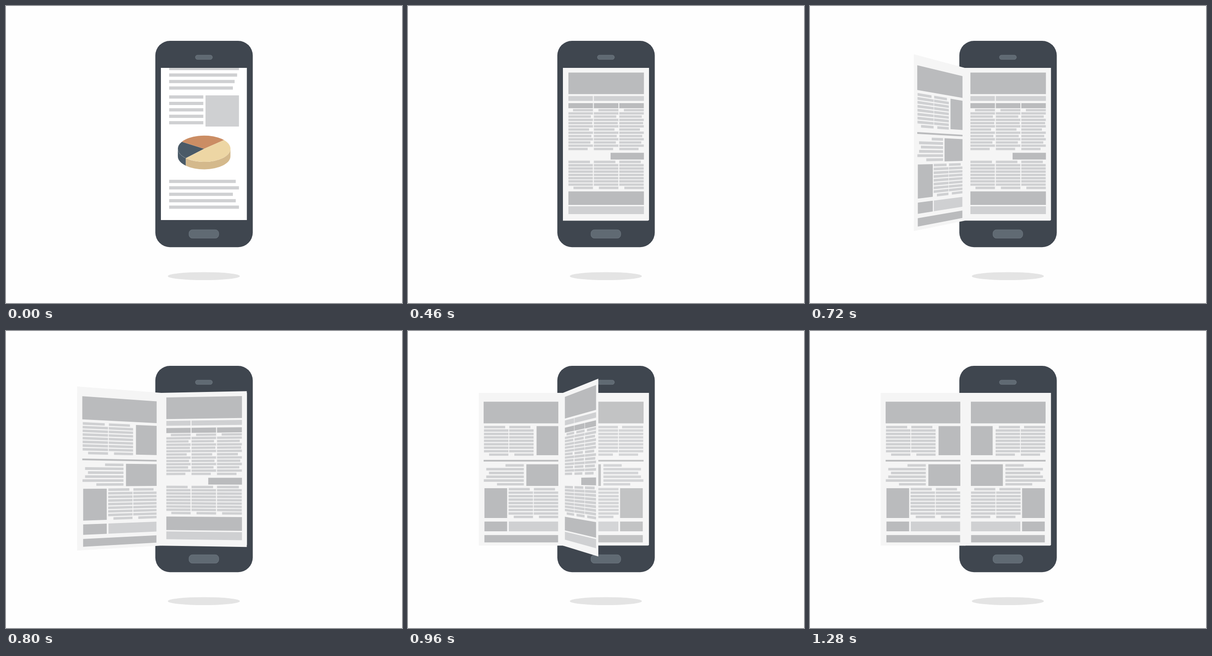
Write an HTML page with a canvas that moves like this. It is 864x648 px and loops after 1.62 s.

```html
<!DOCTYPE html>
<html lang="en">
<head>
<meta charset="utf-8">
<title>Newspaper unfolding from a phone</title>
<style>
  html, body { margin: 0; width: 100%; height: 100%; overflow: hidden; background: #fefefe; }
  canvas { display: block; width: 864px; height: 648px; }
</style>
</head>
<body>
<canvas id="stage" width="864" height="648"></canvas>
<script>
const W = 864, H = 648;
const LOOP = 1620, STEP = 20;
const FADE = 340;
const FLIP_1 = { start: 460, length: 400 };
const FLIP_2 = { start: 780, length: 500 };
const INK = '#babbbd', PALE = '#cfd0d2', PAPER = '#f5f5f5', SLATE = '#3f464f';
const HINGE = 338, CAMERA = 1200, MIRROR = 679;
const TOP = 135, BOTTOM = 468.3;

const ctx = document.getElementById('stage').getContext('2d');
const clamp = v => Math.min(1, Math.max(0, v));
const box = (color, x, y, w, h) => ({ color, x, y, w, h });

// Evenly spaced text lines; each row is [indent, width].
const lines = (x, y, pitch, h, rows) =>
  rows.map(([indent, w], i) => box(PALE, x + indent, y + i * pitch, w, h));

const column = (x, y, pitch, first, last) => {
  const rows = Array.from({ length: 9 }, () => [0, 53.3]);
  rows[0] = first;
  rows[8] = last;
  return lines(x, y, pitch, 5.2, rows);
};

function frontPage() {
  const cols = [350, 405.5, 461];
  const widths = [53.5, 49, 53.5, 52, 53.5, 45, 53.5, 50, 53.5, 48, 53.5, 42];
  const story = [[10, 43.5], ...widths.map(w => [0, w])];
  return [
    box(INK, 350, 145.3, 164.7, 47),
    box(PALE, 350, 196.5, 53.3, 10.5),
    box(PALE, 405.5, 196.5, 109.2, 10.5),
    ...cols.flatMap(x => [
      box(INK, x, 212, 53.5, 11),
      ...lines(x, 224.7, 7.06, 5, story),
      ...column(x, 337.6, 7.08, [0, 47], [11, 42.5])
    ]),
    box(INK, 442, 320.2, 72.7, 14.8),
    box(INK, 350, 404.6, 164.7, 29.4),
    box(PALE, 350, 437, 164.7, 17)
  ];
}

function innerPage() {
  const brief = [40, 82, 76, 82, 87.3, 58.5].map(w => [0, w]);
  return [
    box(INK, 351, 154.2, 163, 47.2),
    box(INK, 351, 207.5, 47.5, 63.5),
    ...[405, 460].flatMap(x => column(x, 207, 7.52, [7, 46], [0, 42])),
    box(INK, 351, 281.3, 163, 3.5),
    box(INK, 351, 290.7, 69.8, 47.3),
    ...lines(426.3, 290.6, 8.22, 5.4, brief),
    ...[351.3, 406.3].flatMap(x => column(x, 342.6, 7.55, [7, 46], [0, 42])),
    box(INK, 462.7, 343, 49.5, 65),
    box(PALE, 351.5, 415.7, 107.5, 21.3),
    box(INK, 462.7, 415.7, 49.5, 21.3),
    box(INK, 351.5, 445.3, 160.8, 16)
  ];
}

const FRONT = frontPage(), INNER = innerPage();

function pill(c, x, y, w, h, r, fill, stroke) {
  c.beginPath();
  c.roundRect(x, y, w, h, r);
  c.fillStyle = fill;
  c.fill();
  if (stroke) {
    c.strokeStyle = stroke;
    c.lineWidth = 0.7;
    c.stroke();
  }
}

function drawPie(c) {
  const cx = 432.3, cy = 311.4, rx = 57.4, ry = 28.7, depth = 16.4;
  const rad = d => d * Math.PI / 180;
  const slice = (from, to, color) => {
    c.beginPath();
    c.moveTo(cx, cy);
    c.ellipse(cx, cy, rx, ry, 0, rad(from), rad(to));
    c.fillStyle = color;
    c.fill();
  };
  const wall = (from, to, color) => {
    c.beginPath();
    c.ellipse(cx, cy, rx, ry, 0, rad(from), rad(to));
    c.ellipse(cx, cy + depth, rx, ry, 0, rad(to), rad(from), true);
    c.fillStyle = color;
    c.fill();
  };
  wall(134, 180, '#4a5a67');
  wall(0, 134, '#d4b98c');
  slice(134, 212, '#4a5a67');
  slice(212, 319, '#cb8d64');
  slice(-41, 134, '#edd6a4');
}

function drawArticle(c) {
  const rows = widths => widths.map(w => [0, w]);
  c.save();
  c.beginPath();
  c.rect(338, TOP, 187.5, 332);
  c.clip();
  [
    ...lines(356, 133, 14.15, 7, rows([152.3, 148.3, 142.8, 139])),
    ...lines(356, 195, 14.05, 7, rows([74.5, 74.5, 74.5, 74.5, 74.5])),
    box(PALE, 435.3, 195, 73, 68),
    ...lines(356, 379.2, 14.05, 7, rows([145.3, 152.3, 139, 145.3, 152.3]))
  ].forEach(b => {
    c.fillStyle = b.color;
    c.fillRect(b.x, b.y, b.w, b.h);
  });
  drawPie(c);
  c.restore();
}

function makePhone(withArticle) {
  const layer = document.createElement('canvas');
  layer.width = W;
  layer.height = H;
  const c = layer.getContext('2d');
  c.fillStyle = '#fefefe';
  c.fillRect(0, 0, W, H);
  c.beginPath();
  c.ellipse(431.6, 589.4, 78.6, 8.7, 0, 0, Math.PI * 2);
  c.fillStyle = '#e4e4e4';
  c.fill();
  pill(c, 325.8, 76, 212.6, 450.2, 32, SLATE);
  pill(c, 413.3, 107.2, 37, 9.4, 4.5, '#606a73', '#78828a');
  pill(c, 399.2, 488.2, 65, 18.4, 7.5, '#606a73', '#78828a');
  c.fillStyle = '#fff';
  c.fillRect(338, TOP, 187.5, 332);
  if (withArticle) drawArticle(c);
  return layer;
}

const articlePhone = makePhone(true), blankPhone = makePhone(false);

// Turn a page point about the hinge and project it from the stage centre.
function project(u, y, angle) {
  const scale = CAMERA / (CAMERA - u * Math.sin(angle));
  const x = HINGE + u * Math.cos(angle);
  return [W / 2 + (x - W / 2) * scale, H / 2 + (y - H / 2) * scale];
}

function quad(u0, u1, y0, y1, angle, color) {
  ctx.beginPath();
  [[u0, y0], [u1, y0], [u1, y1], [u0, y1]].forEach(([u, y]) => ctx.lineTo(...project(u, y, angle)));
  ctx.fillStyle = color;
  ctx.fill();
}

function drawPage(boxes, angle, back) {
  const offset = back ? MIRROR - HINGE : HINGE;
  if (angle === 0) pill(ctx, HINGE, TOP, 187.5, BOTTOM - TOP, [0, 0, 2.5, 0], PAPER);
  else quad(back ? -1 : 0, back ? 183.6 : 187, TOP, BOTTOM, angle, PAPER);
  for (const b of boxes) {
    quad(b.x - offset, b.x + b.w - offset, b.y, b.y + b.h, angle, b.color);
  }
}

function drawLeaf(flip, t) {
  const turn = clamp((t - flip.start) / flip.length);
  const back = turn > 0.5;
  drawPage(back ? INNER : FRONT, turn * Math.PI, back);
}

function overlay(layer, alpha) {
  ctx.globalAlpha = alpha;
  ctx.drawImage(layer, 0, 0);
  ctx.globalAlpha = 1;
}

function draw(t) {
  overlay(blankPhone, 1);
  if (t < FADE) {
    drawPage(FRONT, 0, false);
    overlay(articlePhone, 1 - t / FADE);
    return;
  }
  drawPage(INNER, 0, false);
  overlay(blankPhone, 1 - clamp((t - 660) / FADE));
  const leaves = t < FLIP_2.start ? [FLIP_2, FLIP_1] : [FLIP_1, FLIP_2];
  leaves.forEach(leaf => drawLeaf(leaf, t));
}

const begin = performance.now();
function tick() {
  const t = (performance.now() - begin) % LOOP;
  draw(Math.floor(t / STEP) * STEP);
  requestAnimationFrame(tick);
}
tick();
</script>
</body>
</html>
```
